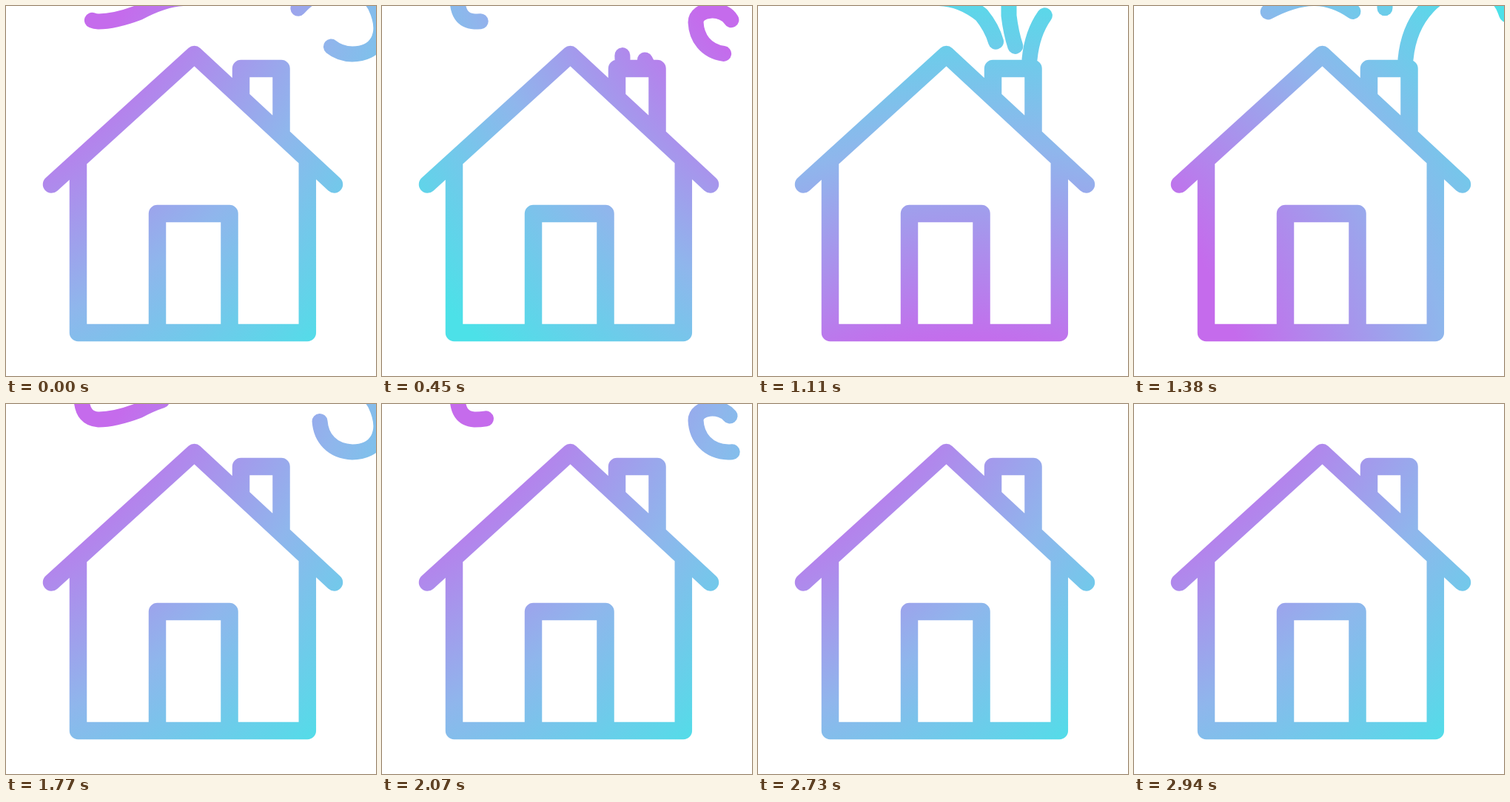
Write an HTML page with a canvas that moves like this. It is 500 by 500 pixels and loops after 2.97 s.

```html
<!DOCTYPE html>
<html lang="en">
<head>
<meta charset="utf-8">
<title>House with smoke</title>
<style>
  html, body { margin: 0; width: 100%; height: 100%; overflow: hidden; background: #fff; }
  canvas { display: block; width: 500px; height: 500px; }
</style>
</head>
<body>
<canvas id="stage" width="500" height="500"></canvas>
<script>
const ctx = document.getElementById('stage').getContext('2d');
const LOOP = 2970;
const FRAME = 30;
const PUFF_GAP = 1650;   // an earlier puff runs this far ahead
const TAIL_DELAY = 520;  // a trail's tail follows its head

const clamp = u => Math.max(0, Math.min(1, u));
const softInOut = u => (u + u * u * (3 - 2 * u)) / 2;
const easeOut = u => 1 - (1 - u) ** 2;

const house = new Path2D(
  'M61.5 241 L254.5 65.5 L443.5 241' +
  'M97.5 209 V441.5 H407.3 V209' +
  'M204.5 441 V280.5 H302 V441' +
  'M317.5 124 V84.5 H372 V174'
);

function trail(path, length, start, duration, ease) {
  return { path: new Path2D(path), length, start, duration, ease };
}

const trails = [
  trail('M325 72 C325 50 316 29 302 12 C264 -18 228 -17 179 9' +
        'C155 18 140 21 125 21 C108 20 102 8 102 -10 V-300', 400, 400, 2000, softInOut),
  trail('M358 78 C348 60 342 38 339 13 V-400', 430, 400, 2000, softInOut),
  trail('M367 72 C370 40 381 18 397 1 C425 -30 480 -35 499 0 C518 40 500 65 468 65' +
        'C440 64 425 45 424 22 C424 2 464 0 473 21', 425, 1010, 1290, easeOut)
];

function drawTrail({ path, length, start, duration, ease }, t) {
  const reach = time => length * ease(clamp((time - start) / duration));
  const head = reach(t), tail = reach(t - TAIL_DELAY);
  if (head <= tail) return;
  ctx.setLineDash([head - tail, 2000]);
  ctx.lineDashOffset = -tail;
  ctx.stroke(path);
}

// The purple centre circles the house once, then rests.
function gradientAt(t) {
  const angle = (222 + Math.min(360, t * 0.207)) * Math.PI / 180;
  const x = 295 + 620 * Math.cos(angle);
  const y = 220 + 620 * Math.sin(angle);
  const g = ctx.createRadialGradient(x, y, 380, x, y, 900);
  g.addColorStop(0, 'rgb(197,107,236)');
  g.addColorStop(0.53, 'rgb(143,182,236)');
  g.addColorStop(1, 'rgb(76,225,232)');
  return g;
}

function draw(t) {
  ctx.fillStyle = '#fff';
  ctx.fillRect(0, 0, 500, 500);
  ctx.strokeStyle = gradientAt(t);
  ctx.lineCap = ctx.lineJoin = 'round';
  ctx.lineWidth = 21;
  for (const smoke of trails) {
    drawTrail(smoke, t);
    drawTrail(smoke, t + PUFF_GAP);
  }
  ctx.setLineDash([]);
  ctx.lineWidth = 23.5;
  ctx.stroke(house);
}

const start = performance.now();
function tick() {
  const t = (performance.now() - start) % LOOP;
  draw(Math.floor(t / FRAME) * FRAME);
  requestAnimationFrame(tick);
}
tick();
</script>
</body>
</html>
```
